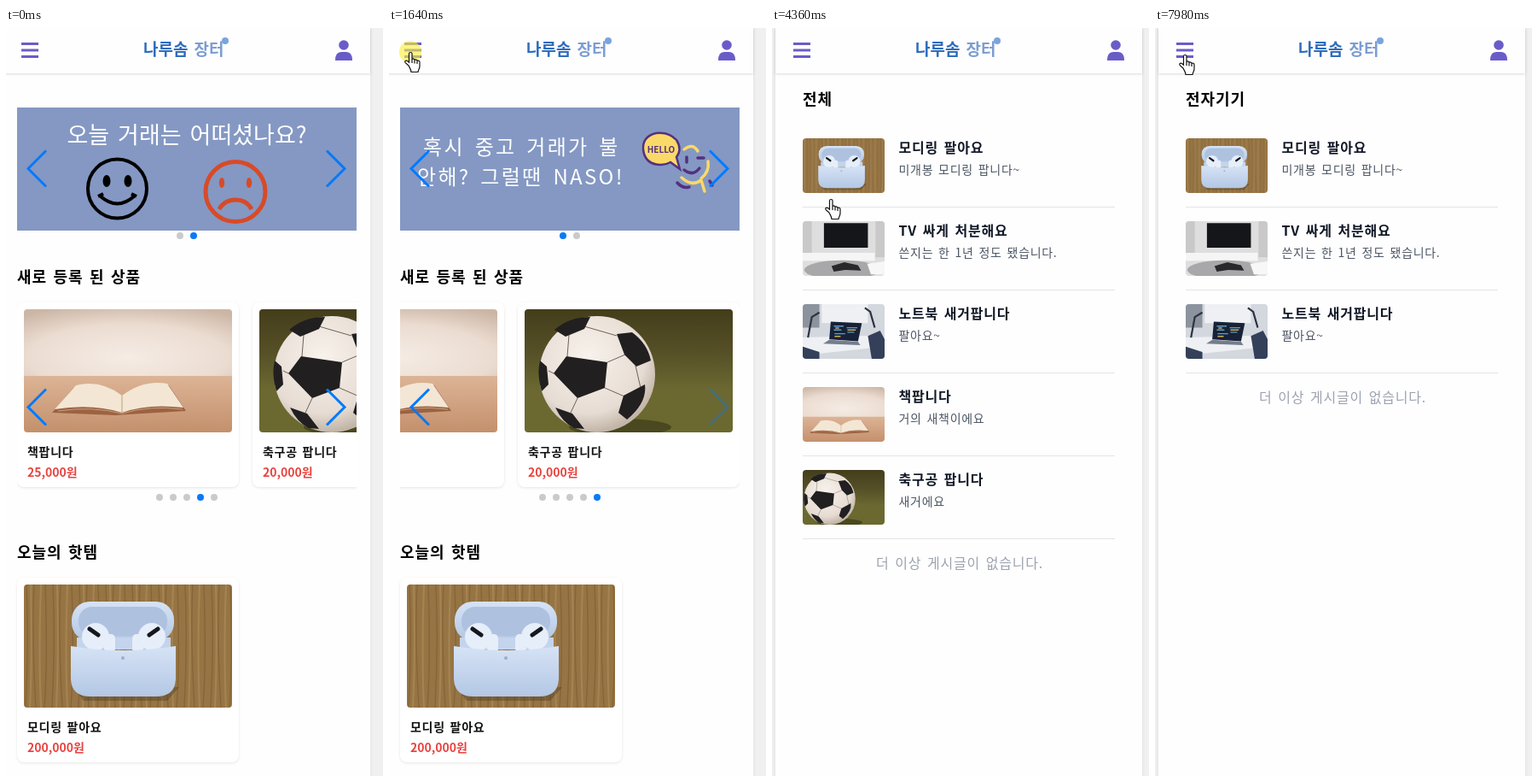
Animation, 442 px wide and 875 px high, one loop 8000 ms. Source, as an HTML page:

```html
<!DOCTYPE html>
<html lang="ko">
<head>
<meta charset="utf-8">
<style>
html, body { margin: 0; height: 100%; overflow: hidden; background: #f0f0f1; }
svg { display: block; }
text { font-family: "Noto Sans CJK KR", "Noto Sans CJK", "Noto Sans", sans-serif; letter-spacing: .05em; word-spacing: .09em; fill: #000; }
.mid { text-anchor: middle; }
.h { font-size: 18px; font-weight: 700; }
.item { font-size: 16px; font-weight: 700; fill: #111827; }
.desc { font-size: 14px; fill: #4b5563; }
.name { font-size: 14px; font-weight: 700; fill: #111; }
.price { font-size: 14px; font-weight: 700; letter-spacing: 0; fill: #e8433f; }
.menu { font-size: 16px; fill: #374151; }
.banner { font-weight: 300; fill: #fff; letter-spacing: 0; }
.spaced { font-size: 24px; letter-spacing: 2.3px; word-spacing: .12em; }
.card { fill: #fff; filter: drop-shadow(0 1px 1.5px rgba(0,0,0,.1)); }
.chev { fill: none; stroke: #007aff; stroke-width: 3; }
</style>
</head>
<body>
<svg id="stage" width="442" height="875" viewBox="0 0 442 875">
  <defs>
    <clipPath id="swiper"><rect x="13" y="90" width="398" height="460"/></clipPath>
    <clipPath id="clip244"><rect width="244" height="144" rx="4"/></clipPath>
    <clipPath id="clip96"><rect width="96" height="64" rx="4"/></clipPath>
    <radialGradient id="wall" cy=".7" r=".8"><stop stop-color="#f5ece5"/><stop offset=".6" stop-color="#ebdcd1"/><stop offset="1" stop-color="#cbb5a4"/></radialGradient>
    <linearGradient id="table" x2="0" y2="1"><stop stop-color="#dcb496"/><stop offset="1" stop-color="#c4906c"/></linearGradient>
    <linearGradient id="grass" x2="0" y2="1"><stop stop-color="#443d1b"/><stop offset=".35" stop-color="#565027"/><stop offset=".65" stop-color="#6b6831"/><stop offset="1" stop-color="#6b692f"/></linearGradient>
    <radialGradient id="leather" cx=".42" cy=".35" r=".65"><stop stop-color="#f8f2ec"/><stop offset=".75" stop-color="#e6dcd3"/><stop offset="1" stop-color="#c2b5a7"/></radialGradient>
    <linearGradient id="shell" x2="0" y2="1"><stop stop-color="#d6e3f6"/><stop offset="1" stop-color="#b3c7e4"/></linearGradient>
    <pattern id="wood" width="31" height="144" patternUnits="userSpaceOnUse">
      <path fill="#967444" d="M0 0H31V144H0Z"/>
      <path stroke="#866538" fill="none" stroke-width="1.5" d="M3 0Q6 70 2 144M12 0Q9 60 14 144M25 0Q28 90 24 144"/>
      <path stroke="#a68452" fill="none" stroke-width="2" d="M8 0Q10 80 7 144M20 0Q17 80 20 144"/>
    </pattern>

    <symbol id="book" viewBox="0 0 244 144" preserveAspectRatio="xMidYMid slice">
      <path fill="url(#wall)" d="M0 0H244V80H0Z"/>
      <path fill="url(#table)" d="M0 78H244V144H0Z"/>
      <path fill="#9c6242" d="M33 121L58 92L114 102L170 89L190 119L122 123L108 124Z"/>
      <path fill="#f3e6d4" d="M36 117L61 89Q90 82 115 101Q140 82 168 87L187 115Q145 110 115 121Q80 110 36 117Z"/>
      <path fill="none" stroke="#c59f7c" d="M115 101V121M40 119Q80 113 115 122Q148 112 186 117"/>
    </symbol>
    <symbol id="ball" viewBox="0 0 244 144" preserveAspectRatio="xMidYMid slice">
      <path fill="url(#grass)" d="M0 0H244V144H0Z"/>
      <ellipse cx="112" cy="138" rx="60" ry="10" fill="#3c3b18" opacity=".7"/>
      <circle cx="85" cy="76" r="68" fill="url(#leather)"/>
      <path fill="none" stroke="#6d6259" d="M52 30L50 55M97 62L118 53M94 92L117 102M62 104L54 121M34 75L28 72M70 20L108 31M130 66L136 92"/>
      <path fill="#211f20" d="M49 55L97 62L94 92L62 104L34 75ZM35 24Q52 9 77 9L70 23L48 32ZM108 29L126 27Q144 40 148 60L131 67L117 53ZM116 101L141 88Q144 109 120 129L110 121ZM18 60L26 67L28 88L20 96Q14 78 18 60ZM36 115L56 122L70 140L58 139Q44 132 36 115Z"/>
    </symbol>
    <symbol id="buds" viewBox="0 0 244 144" preserveAspectRatio="xMidYMid slice">
      <path fill="url(#wood)" d="M0 0H244V144H0Z"/>
      <path fill="#4d3a1f" opacity=".4" d="M58 120L70 136H168L182 120Z"/>
      <rect x="56" y="20" width="120" height="46" rx="21" fill="url(#shell)"/>
      <rect x="64" y="26" width="104" height="34" rx="16" fill="#aec2e0"/>
      <path fill="#c3d4ec" d="M62 62H172V76H62Z"/>
      <g fill="#e6eefa"><circle cx="84" cy="61" r="16"/><circle cx="150" cy="61" r="16"/><rect x="94" y="58" width="13" height="22" rx="5"/><rect x="127" y="58" width="13" height="22" rx="5"/></g>
      <path stroke="#16181d" stroke-width="5" stroke-linecap="round" d="M77 52L87 59M157 52L147 59"/>
      <path fill="url(#shell)" d="M55 72Q117 82 178 72V109Q178 131 155 131H78Q55 131 55 109Z"/>
      <circle cx="116" cy="86" r="2" fill="#9badc8"/>
    </symbol>
    <symbol id="tv" viewBox="0 0 244 144" preserveAspectRatio="xMidYMid slice">
      <path fill="#dededf" d="M0 0H244V144H0Z"/>
      <path fill="#c9c9ca" d="M14 0H38V90H14ZM206 0H244V95H206Z"/>
      <path fill="#151619" d="M70 5H186V70H70Z"/>
      <path fill="#f5f5f5" d="M14 83H204V104H14Z"/>
      <ellipse cx="118" cy="128" rx="100" ry="25" fill="#a8a8aa"/>
      <path fill="#29292c" d="M90 118L124 108L160 116L168 130L126 128L96 133Z"/>
      <path fill="#f7f7f7" d="M184 112L230 106V140H194Z"/>
    </symbol>
    <symbol id="laptop" viewBox="0 0 244 144" preserveAspectRatio="xMidYMid slice">
      <path fill="#d3d7de" d="M0 0H244V144H0Z"/>
      <path fill="#8c939e" d="M14 0H58V62H14Z"/><path fill="#eef0f3" d="M64 0H186V50H64ZM14 88L224 82L230 112L60 130L14 112Z"/>
      <path fill="#34405a" d="M186 84L218 70L232 96V144H196ZM14 112L58 126V144H14Z"/>
      <path stroke="#2d3340" stroke-width="5" fill="none" d="M28 88L38 34L58 22M204 62L192 20L178 10"/>
      <path fill="#182238" d="M88 46L170 50L160 98L84 93Z"/>
      <path stroke="#58a0c8" stroke-width="3" d="M96 58H122M96 68H116M98 78H126M130 62H158M132 74H150"/>
      <path stroke="#d0a95d" stroke-width="3" d="M100 63H110M132 68H154M98 85H114"/>
      <path fill="#737d8d" d="M84 94L160 99L166 108L68 104Z"/>
    </symbol>
  </defs>

  <g id="page">
    <rect x="-3" width="430" height="875" fill="#fefefe" style="filter:drop-shadow(0 0 2px rgba(0,0,0,.08))"/>
    <g id="home"></g>
    <g id="list"></g>
    <g id="menu"></g>
    <rect x="-3" width="430" height="53" fill="#fefefe" style="filter:drop-shadow(0 1px 1.5px rgba(0,0,0,.14))"/>
    <path stroke="#6a5cc8" stroke-width="3" d="M18 18.5H38M18 26H38M18 33.5H38"/>
    <g fill="#6a5cc8"><circle cx="396" cy="20" r="5.8"/><path d="M386 38Q386 28 393 28H399Q406 28 406 38Z"/></g>
    <text x="161" y="32" style="font:900 19px 'Noto Sans CJK KR',sans-serif;letter-spacing:0;fill:#2f6cbd">나루솜 <tspan fill="#7c9dd2">장터</tspan></text>
    <circle cx="257" cy="15" r="4" fill="#79a4e0"/>
  </g>
  <g id="cursor">
    <circle id="click" r="13" fill="#f8ef3a" opacity=".62"/>
    <g fill="#fff" stroke="#111">
      <path id="arrow" d="M.5 .5V17L4.3 13.4L7.2 19.6L9.6 18.5L6.8 12.5H12Z"/>
      <path id="hand" transform="translate(-7)" stroke-width="1.2" d="M5 16L1.2 12.6C0 11 1.6 9.4 3.5 10.6L5.5 12.3V2C5.5 0 9 0 9 2V8.5C10 7.5 12 8 12 9.5C13 8.5 15 9 15 10.5C16 9.8 18 10.2 18 12V17C18 19 16.5 20.5 16 23.5H8C8 20.5 6 18.5 5 16ZM9 8.5V13M12 9.5V13.5M15 10.5V14"/>
    </g>
  </g>
</svg>

<script>
const LOOP = 8000, FRAME = 70;
const $ = id => document.getElementById(id);
const show = (id, on) => $(id).style.display = on ? '' : 'none';
const within = (t, a, b) => t >= a && t < b;

const text = (x, y, cls, s, extra = '') => `<text x="${x}" y="${y}" class="${cls}" ${extra}>${s}</text>`;
const photo = (id, x, y, w, h) =>
  `<g transform="translate(${x} ${y})" clip-path="url(#clip${w})"><use href="#${id}" width="${w}" height="${h}"/></g>`;
const card = (x, y, id, name, price) =>
  `<rect class="card" x="${x}" y="${y}" width="260" height="216" rx="8"/>` + photo(id, x + 8, y + 8, 244, 144) +
  text(x + 12, y + 179.5, 'name', name) + text(x + 12, y + 204, 'price', price);
const chevrons = (y, id) =>
  `<path class="chev" d="M47 ${y - 21}L26 ${y}L47 ${y + 21}"/><path class="chev" id="${id}" d="M376 ${y - 21}L397 ${y}L376 ${y + 21}"/>`;
const dots = (cls, x, y, n) =>
  Array.from({ length: n }, (_, i) => `<circle class="${cls}" cx="${x + 16 * i}" cy="${y}" r="4"/>`).join('');

const moodBanner = `<rect x="13" y="93" width="398" height="144" fill="#8498c3"/>
  ${text(212, 134.5, 'banner mid', '오늘 거래는 어떠셨나요?', 'font-size="27"')}
  <g fill="none" stroke="#000" stroke-width="4"><circle cx="130.5" cy="188" r="34.5"/><path d="M111 197Q130.5 214 150 197M108 197L114 194M147 194L153 197"/></g>
  <ellipse cx="118" cy="179" rx="4.5" ry="7"/><ellipse cx="143" cy="179" rx="4.5" ry="7"/>
  <g fill="none" stroke="#d84a28" stroke-width="5"><circle cx="269" cy="191.5" r="35"/><path d="M250 212Q256 201 269 201Q282 201 288 212"/></g>
  <g fill="#d84a28"><ellipse cx="253" cy="181" rx="3.2" ry="6"/><ellipse cx="285" cy="181" rx="3.2" ry="6"/></g>`;

const safeBanner = `<g transform="translate(402)"><rect x="13" y="93" width="398" height="144" fill="#8498c3"/>
  ${text(40, 148, 'banner spaced', '혹시 중고 거래가 불')}
  ${text(33, 183, 'banner spaced', '안해? 그럴땐 NASO!')}
  <path fill="#fbd968" stroke="#55307f" stroke-width="2.5" d="M330 157L341 165L337 151Q344 142 337 131Q328 121 313 123Q297 127 298 142Q300 160 319 160Q325 160 330 157Z"/>
  ${text(319, 146, 'mid', 'HELLO', 'style="font-size:10px;font-weight:700;letter-spacing:0;fill:#55307f"')}
  <g fill="none" stroke-width="3.5" stroke-linecap="round">
    <path stroke="#fbd968" d="M346 142Q356 134 362 144M374 156Q376 168 366 176M343 175Q355 186 366 178L370 191"/>
    <path stroke="#55307f" d="M349 151V157M362 152H369M346 166Q356 174 364 164M338 181Q344 188 352 186M376 179L379 184"/>
  </g></g>`;

$('home').innerHTML =
  `<g clip-path="url(#swiper)"><g id="banners">${moodBanner}${safeBanner}</g></g>` +
  chevrons(164.5, 'bannerNext') + dots('bannerDot', 204, 243, 2) +
  text(13, 298, 'h', '새로 등록 된 상품') +
  `<g clip-path="url(#swiper)"><g id="products">${card(13, 321, 'book', '책팝니다', '25,000원')}${card(289, 321, 'ball', '축구공 팝니다', '20,000원')}</g></g>` +
  chevrons(443.5, 'productNext') + dots('productDot', 180, 549, 5) +
  text(13, 620, 'h', '오늘의 핫템') + card(13, 643, 'buds', '모디링 팔아요', '200,000원');

const posts = [
  ['buds', '모디링 팔아요', '미개봉 모디링 팝니다~'],
  ['tv', 'TV 싸게 처분해요', '쓴지는 한 1년 정도 됐습니다.'],
  ['laptop', '노트북 새거팝니다', '팔아요~'],
  ['book', '책팝니다', '거의 새책이에요'],
  ['ball', '축구공 팝니다', '새거에요'],
];
const lateImages = ['tv', 'book', 'ball'];

function listMarkup(title, count, loading, imagesReady) {
  let out = text(29, 90, 'h', title);
  if (loading) return out + text(212.5, 147, 'mid', '로딩중...', 'font-size="16" style="fill:#64748b"');
  posts.slice(0, count).forEach(([id, name, desc], i) => {
    const y = 129 + 97 * i;
    out += imagesReady || !lateImages.includes(id) ? photo(id, 29, y, 96, 64)
      : `<rect x="29" y="${y}" width="96" height="64" rx="4" fill="#f3f4f6"/>`;
    out += text(141.5, y + 16.5, 'item', name) + text(141.5, y + 42, 'desc', desc) +
      `<path stroke="#e2e4e8" d="M29 ${y + 80.5}H395"/>`;
  });
  return out + text(213, 147 + 97 * count - 0.5 * 0, 'mid', '더 이상 게시글이 없습니다.', 'font-size="16" style="fill:#9ca3af"');
}

$('menu').innerHTML =
  `<path fill="#fefefe" style="filter:drop-shadow(0 5px 6px rgba(0,0,0,.13))" d="M13 53H237V429Q237 437 229 437H21Q13 437 13 429Z"/>
  <rect x="29" y="65" width="192" height="40" rx="4" fill="#6d56cf"/>` +
  text(125.5, 91, 'mid', '상품 등록하기', 'font-size="16" style="fill:#fff"') + text(29, 142, 'h', '카테고리') +
  ['전체', '전자기기', '패션/잡화', '가구', '스포츠', '게임/취미', '도서', '기타']
    .map((s, i) => text(29, 191 + 32 * i, 'menu', s)).join('');

// Pointer moves: start time, number of steps, destination
const moves = [
  [200, 5, 404, 826], [730, 12, 25, 28], [2160, 12, 63, 181], [3000, 1, 61, 183], [3690, 3, 75, 236],
  [4290, 8, 37, 3], [4850, 2, 34, 25], [5450, 12, 76, 213], [6880, 3, 84, 217], [7290, 11, 35, 31],
];
const clicks = [[1570, 1770], [3140, 3210], [4990, 5120], [6350, 6480]];
const stepsSince = (t, start) => Math.floor((t - start + 15) / FRAME);

function pointer(t) {
  let x = 411, y = 884;
  for (const [start, steps, toX, toY] of moves) {
    if (t < start) break;
    const u = Math.min(1, (stepsSince(t, start) + 1) / steps), k = u * u * (3 - 2 * u);
    x += (toX - x) * k;
    y += (toY - y) * k;
  }
  return [x, y];
}

// CSS "ease": cubic-bezier(.25, .1, .25, 1)
function ease(u) {
  let lo = 0, hi = 1, s;
  const bezier = (a, b) => 3 * a * s * (1 - s) ** 2 + 3 * b * s * s * (1 - s) + s ** 3;
  for (let i = 0; i < 16; i++) {
    s = (lo + hi) / 2;
    if (bezier(.25, .25) < u) lo = s; else hi = s;
  }
  return bezier(.1, 1);
}

const markDot = (cls, active) => document.querySelectorAll('.' + cls)
  .forEach((dot, i) => dot.setAttribute('fill', i === active ? '#0a7af5' : '#cbcac9'));

let listKey;
function draw(t) {
  const home = t < 3210, loading = within(t, 3210, 3290) || within(t, 6480, 6550);
  const menu = within(t, 1770, 3210) || within(t, 5120, 6480), slid = t >= 730;
  show('home', home);
  show('list', !home);
  show('menu', menu);
  $('page').setAttribute('transform', `translate(${home ? 0 : 7})`);

  const shift = slid ? ease(Math.min(1, (stepsSince(t, 730) * FRAME + 5) / 300)) : 0;
  $('banners').setAttribute('transform', `translate(${-402 * shift})`);
  $('products').setAttribute('transform', `translate(${-138 * shift})`);
  $('productNext').setAttribute('opacity', slid ? .35 : 1);
  markDot('bannerDot', slid ? 0 : 1);
  markDot('productDot', slid ? 4 : 3);

  const electronics = t >= 6480;
  const args = [electronics ? '전자기기' : '전체', electronics ? 3 : 5, loading, t >= 3360];
  if (listKey !== args.join()) {
    listKey = args.join();
    $('list').innerHTML = listMarkup(...args);
  }

  const [x, y] = pointer(t);
  const hand = !loading && (y < 45 || (menu ? within(y, 65, 105) || y > 170 : home ? within(y, 321, 537) : y > 113));
  show('cursor', t >= 200);
  show('hand', hand);
  show('arrow', !hand);
  show('click', clicks.some(([a, b]) => within(t, a, b)));
  $('cursor').setAttribute('transform', `translate(${Math.round(x)} ${Math.round(y)})`);
}

const begin = performance.now();
function tick() {
  draw((performance.now() - begin) % LOOP);
  requestAnimationFrame(tick);
}
tick();
</script>
</body>
</html>
```
